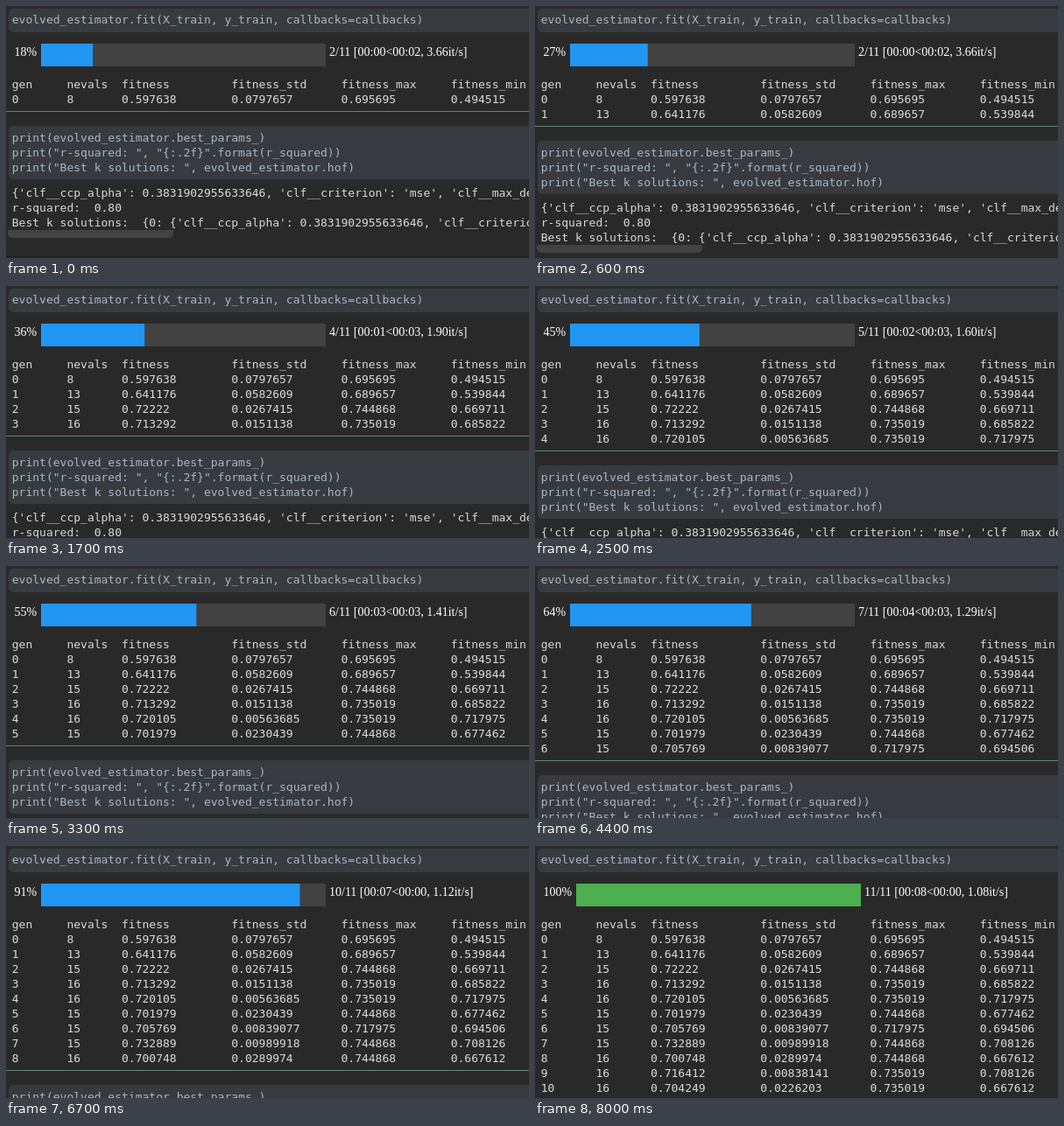
Animation, 597 px wide and 288 px high, one loop 9 s. Source, as an HTML page:

```html
<!DOCTYPE html>
<html lang="en">
<head>
<meta charset="utf-8">
<title>Evolving an estimator</title>
<style>
html, body { margin: 0; width: 100%; height: 100%; overflow: hidden; background: #292929; }
svg { display: block; width: 597px; height: 288px; }
text { white-space: pre; font: 13px "DejaVu Sans Mono", monospace; fill: #d9d9d9; }
.code { fill: #a9b7c6; }
.label { font: 14px "Liberation Serif", serif; fill: #fff; }
.cell { fill: #373b3f; }
</style>
</head>
<body>
<svg viewBox="0 0 597 288">
  <rect class="cell" x="3" y="3" width="620" height="27" rx="5"/>
  <text class="label" id="percent" x="9.4" y="57"></text>
  <g id="progress">
    <rect x="40" y="43" width="325" height="26" fill="#424242"/>
    <rect id="bar" x="40" y="43" height="26"/>
  </g>
  <text class="label" id="status" y="57"></text>
  <g id="table"></g>
  <g id="below">
    <rect y="120" width="597" height="1" fill="#5f8775"/>
    <rect class="cell" x="3" y="137" width="620" height="61" rx="5"/>
    <path d="M2 256H191V259Q191 265 185 265H8Q2 265 2 259Z" fill="#424242"/>
    <rect y="286" width="597" height="1" fill="#202020"/>
  </g>
</svg>
<script>
const LOOP = 9000, LINE = 17, BAR_WIDTH = 325, TOTAL = 11;
const $ = id => document.getElementById(id);

const rowTimes = [0, 500, 1200, 1700, 2500, 3300, 4400, 5200, 6100, 7400, 8000];
const barTimes = [0, 600, 1300, 2100, 2900, 3900, 4700, 5900, 6700, 7600];
const statusTimes = [0, 700, 1300, 2100, 3000, 3900, 4700, 5900, 6700, 7600];
const DONE = 7700;

const statuses = [
  '00:00<00:02, 3.66', '00:01<00:03, 2.44', '00:01<00:03, 1.90', '00:02<00:03, 1.60',
  '00:03<00:03, 1.41', '00:04<00:03, 1.29', '00:05<00:02, 1.24', '00:06<00:01, 1.20',
  '00:07<00:00, 1.12', '00:08<00:00, 1.08'
];

const results = [
  '8 0.597638 0.0797657 0.695695 0.494515',
  '13 0.641176 0.0582609 0.689657 0.539844',
  '15 0.72222 0.0267415 0.744868 0.669711',
  '16 0.713292 0.0151138 0.735019 0.685822',
  '16 0.720105 0.00563685 0.735019 0.717975',
  '15 0.701979 0.0230439 0.744868 0.677462',
  '15 0.705769 0.00839077 0.717975 0.694506',
  '15 0.732889 0.00989918 0.744868 0.708126',
  '16 0.700748 0.0289974 0.744868 0.667612',
  '16 0.716412 0.00838141 0.735019 0.708126',
  '16 0.704249 0.0226203 0.735019 0.667612'
];

function addText(parent, y, content, className = '') {
  const node = document.createElementNS('http://www.w3.org/2000/svg', 'text');
  node.setAttribute('x', 6.8);
  node.setAttribute('y', y);
  node.setAttribute('class', className);
  node.textContent = content;
  parent.append(node);
  return node;
}

const columns = line => line.split(' ').map((s, i) => s.padEnd(i < 2 ? 8 : 16)).join('');

addText($('table'), 20, 'evolved_estimator.fit(X_train, y_train, callbacks=callbacks)', 'code');
addText($('table'), 94, columns('gen nevals fitness fitness_std fitness_max fitness_min'));
const rows = results.map((line, i) => addText($('table'), 111 + i * LINE, columns(i + ' ' + line)));

[
  'print(evolved_estimator.best_params_)',
  'print("r-squared: ", "{:.2f}".format(r_squared))',
  'print("Best k solutions: ", evolved_estimator.hof)'
].forEach((line, i) => addText($('below'), 155 + i * LINE, line, 'code'));

const params = "{'clf__ccp_alpha': 0.3831902955633646, 'clf__criterion': 'mse', 'clf__max_depth': 8}";
[params, 'r-squared:  0.80', 'Best k solutions:  {0: ' + params]
  .forEach((line, i) => addText($('below'), 218 + i * LINE, line));

const countReached = (times, t) => times.filter(start => start <= t).length;

function draw(t) {
  const shown = countReached(rowTimes, t);
  rows.forEach((row, i) => row.setAttribute('visibility', i < shown ? 'visible' : 'hidden'));
  $('below').setAttribute('transform', `translate(0 ${(shown - 1) * LINE})`);

  const step = countReached(barTimes, t) + 1;
  const shift = step === TOTAL ? 7 : 0; // the third digit of 100% pushes the bar right
  $('percent').textContent = Math.round(step / TOTAL * 100) + '%';
  $('progress').setAttribute('transform', `translate(${shift} 0)`);
  $('bar').setAttribute('width', BAR_WIDTH * step / TOTAL);
  $('bar').setAttribute('fill', t >= DONE ? '#4caf50' : '#2196f3');

  const reported = countReached(statusTimes, t) + 1;
  $('status').setAttribute('x', 369 + shift);
  $('status').textContent = `${reported}/${TOTAL} [${statuses[reported - 2]}it/s]`;
}

const start = performance.now();
function tick() {
  draw((performance.now() - start) % LOOP);
  requestAnimationFrame(tick);
}
tick();
</script>
</body>
</html>
```
